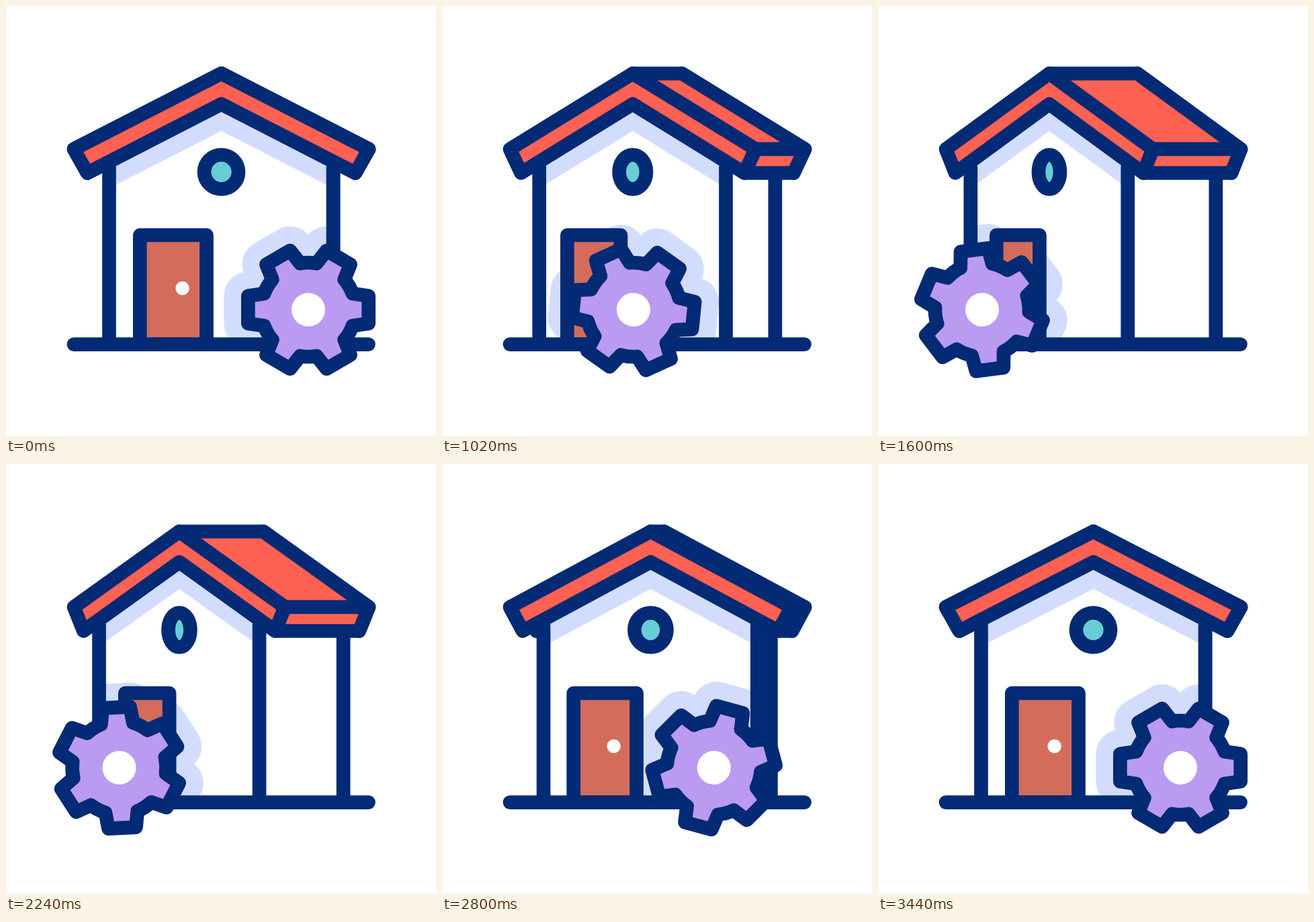
Write an HTML page with a canvas that moves like this. It is 640 px wide and 640 px high and loops after 3600 ms.

```html
<!DOCTYPE html>
<html lang="en">
<head>
<meta charset="utf-8">
<title>House and gear</title>
<style>
  html, body { margin: 0; width: 100%; height: 100%; overflow: hidden; background: #fff; }
  canvas { display: block; width: 100vmin; height: 100vmin; }
</style>
</head>
<body>
<canvas id="stage" width="640" height="640"></canvas>
<script>
const ctx = document.getElementById('stage').getContext('2d');
const NAVY = '#032a75', RED = '#ff6152', DOOR = '#d46c5c', TEAL = '#68cdd4',
      LILAC = '#bb9af2', SHADE = '#d2ddfe', WHITE = '#fff';
const LOOP = 3600, LINE = 20.7, LEFT = 101, RIGHT = 540, FLOOR = 503.6;
const TRAVEL = 298, TURN = -98.3 * Math.PI / 180, SHIFT = 66.2;

// Cubic bezier easing with end heights 0 and 1
function bezier(x1, x2) {
  const at = (s, a, b) => 3 * (1 - s) * (1 - s) * s * a + 3 * (1 - s) * s * s * b + s * s * s;
  return x => {
    let lo = 0, hi = 1;
    for (let i = 0; i < 30; i++) {
      const mid = (lo + hi) / 2;
      if (at(mid, x1, x2) < x) lo = mid; else hi = mid;
    }
    return at(lo, 0, 1);
  };
}
const easeOut = bezier(0.83, 0.17), easeBack = bezier(0.8, 0.165);

function progress(t) {
  if (t <= 200 || t >= 3440) return 0;
  return t < 1810 ? easeOut((t - 200) / 1610) : 1 - easeBack((t - 1810) / 1630);
}

function poly(points, closed = true) {
  const path = new Path2D();
  points.forEach(([x, y]) => path.lineTo(x, y));
  if (closed) path.closePath();
  return path;
}

function paint(path, fill, stroke = NAVY, width = LINE) {
  if (fill) { ctx.fillStyle = fill; ctx.fill(path); }
  if (stroke) { ctx.strokeStyle = stroke; ctx.lineWidth = width; ctx.stroke(path); }
}

const line = (x1, y1, x2, y2) => paint(poly([[x1, y1], [x2, y2]], false));

function ellipse(x, y, rx, ry) {
  const path = new Path2D();
  path.ellipse(x, y, rx, ry, 0, 0, Math.PI * 2);
  return path;
}

function makeGear() {
  const path = new Path2D(), deg = Math.PI / 180;
  for (let a = 0; a < 360; a += 60) {
    for (const [r, off] of [[70, -20], [92, -12.9], [92, 12.9], [70, 20]]) {
      path.lineTo(r * Math.cos((a + off) * deg), r * Math.sin((a + off) * deg));
    }
    path.arc(0, 0, 70, (a + 20) * deg, (a + 40) * deg);
  }
  path.closePath();
  return path;
}
const gear = makeGear();

function withGear(p, draw) {
  ctx.save();
  ctx.translate(450 - TRAVEL * p, 452);
  ctx.rotate(TURN * p);
  draw();
  ctx.restore();
}

function drawHouse(p) {
  const d = SHIFT * p, k = 1 - d / 219.5;
  const fx = x => LEFT + (x - LEFT) * k;       // front plane
  const bx = x => fx(x) + 2 * d;               // back plane
  const gable = f => poly([[f(320.5), 100.5], [f(RIGHT), 213], [f(520), 248.5],
    [f(320.5), 146], [f(121), 248.5], [f(LEFT), 213]]);
  const wallL = fx(153.5), wallR = fx(487), mid = fx(320.5);

  // Back and side
  line(bx(487), 240, bx(487), FLOOR);
  paint(gable(bx), RED);
  paint(poly([[mid, 100.5], [bx(320.5), 100.5], [RIGHT, 213], [fx(RIGHT), 213]]), RED);
  paint(poly([[fx(RIGHT), 213], [RIGHT, 213], [bx(520), 248.5], [fx(520), 248.5]]), RED);

  // Front face with shadows
  const face = poly([[wallL, FLOOR], [wallL, 231.5], [mid, 146], [wallR, 231.5], [wallR, FLOOR]]);
  paint(face, WHITE, null);
  paint(poly([[wallL, 231.5], [mid, 146], [wallR, 231.5],
    [wallR, 271.3], [mid, 186], [wallL, 271.3]]), SHADE, null);
  ctx.save();
  ctx.clip(face);
  withGear(p, () => paint(gear, SHADE, SHADE, 72));
  ctx.restore();

  paint(ellipse(mid, 247, 25.5 - 0.145 * d, 25.5), TEAL);

  // Door
  const dl = 199.3 - 0.351 * d, dr = 298.5 - 0.886 * d;
  paint(poly([[dl, FLOOR], [dl, 341], [dr, 341], [dr, FLOOR]]), DOOR);
  paint(ellipse(dl + (dr - dl) * 0.638, 420, 10.3, 10.3), WHITE, null);

  line(wallL, 240, wallL, FLOOR);
  line(wallR, 240, wallR, FLOOR);
  paint(gable(fx), RED);
  line(LEFT, FLOOR, RIGHT - 0.5, FLOOR);
}

function render(t) {
  const p = progress(t);
  ctx.fillStyle = WHITE;
  ctx.fillRect(0, 0, 640, 640);
  ctx.lineJoin = ctx.lineCap = 'round';
  drawHouse(p);
  withGear(p, () => {
    paint(gear, LILAC);
    paint(ellipse(0, 0, 25, 25), WHITE, null);
  });
}

let start;
function tick(now) {
  start ??= now;
  render((now - start) % LOOP);
  requestAnimationFrame(tick);
}
render(0);
requestAnimationFrame(tick);
</script>
</body>
</html>
```
